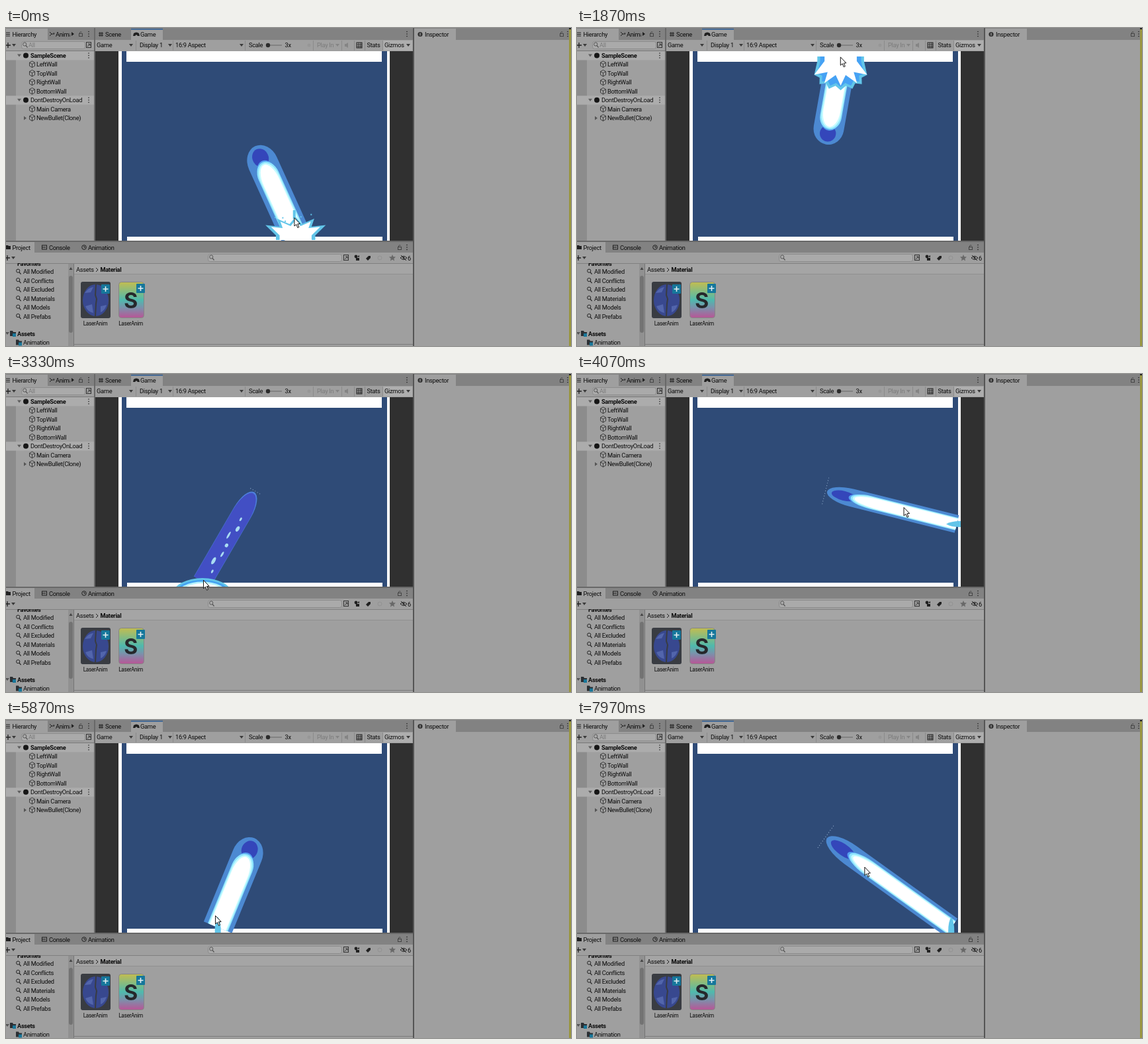
Write an HTML page with a canvas that moves like this. It is 854 by 480 pixels and loops after 8000 ms.

```html
<!DOCTYPE html>
<html lang="en">
<head>
<meta charset="utf-8">
<title>Laser test</title>
<style>
html, body { margin: 0; width: 100%; height: 100%; overflow: hidden; background: #9f9f9f; }
svg, canvas { position: absolute; left: 0; top: 0; width: 854px; height: 480px; }
text { font-family: Roboto, sans-serif; font-size: 9.3px; letter-spacing: -.3px; fill: #0c0c0c; white-space: pre; }
text.bold { font-weight: 700; font-size: 9.2px; }
text.faded { fill: #7c7c7c; }
text.label { font-size: 8.2px; text-anchor: middle; }
text.big { font: 700 32px Inter, sans-serif; text-anchor: middle; fill: #26282c; }
</style>
</head>
<body>
<svg id="ui" viewBox="0 0 854 480">
  <defs>
    <linearGradient id="rainbow" x2="0" y2="1">
      <stop offset="0" stop-color="#c2bd50"/><stop offset=".5" stop-color="#4fb9ad"/>
      <stop offset=".72" stop-color="#7b91ab"/><stop offset="1" stop-color="#b95596"/>
    </linearGradient>
    <clipPath id="tree"><path d="M0 355H93V480H0Z"/></clipPath>
    <clipPath id="tab"><path d="M74 0H97V18H74Z"/></clipPath>
  </defs>
</svg>
<canvas id="stage" width="854" height="480"></canvas>
<script>
const ui = document.getElementById('ui');
const add = (tag, attrs, content = '') => {
  const node = document.createElementNS('http://www.w3.org/2000/svg', tag);
  for (const key in attrs) node.setAttribute(key, attrs[key]);
  node.textContent = content;
  ui.append(node);
};
const box = (x, y, w, h, fill, rx = 0, extra = {}) => add('rect', { x, y, width: w, height: h, fill, rx, ...extra });
const label = (x, y, content, cls = '', extra = {}) => add('text', { x, y, class: cls, ...extra }, content);
const shape = (d, fill = 'none', stroke = 'none', width = 1) => add('path', { d, fill, stroke, 'stroke-width': width });
const dot = (cx, cy, r, fill, stroke = 'none') => add('circle', { cx, cy, r, fill, stroke });
const INK = '#202020', PANEL = '#9f9f9f', BAR = '#828282', EDGE = '#686868', FAINT = '#858585';

const down = (x, y, fill = '#3a3a3a') => shape(`M${x - 3} ${y - 2}h6l-3 4z`, fill);
const right = (x, y, fill = '#555') => shape(`M${x - 2} ${y - 3}v6l4-3z`, fill);
const menu = (x, y) => [-3.5, 0, 3.5].forEach(d => dot(x, y + d, .8, INK));
const lock = (x, y) => {
  box(x - 2.5, y - .5, 5, 4, 'none', 0, { stroke: '#444' });
  shape(`M${x - 1.5} ${y}v-2q1.5-3 3 0`, 'none', '#444');
};
const lens = (x, y, color = INK) => {
  dot(x - .8, y - 1, 2.6, 'none', color);
  shape(`M${x + 1} ${y + 1}l2.6 3`, 'none', color, 1.2);
};
const field = (x, y, w) => { box(x, y, w, 11, '#aaa', 3, { stroke: '#8c8c8c' }); lens(x + 5.5, y + 5, '#555'); };
const picker = (x, y) => {
  box(x, y, 7, 8, 'none', 0, { stroke: '#333' });
  shape(`M${x + 1.5} ${y + 6.5}l4-4m-3 0h3v3`, 'none', '#333');
};
const cube = (x, y) => shape(`M${x} ${y - 5}l4 2.3v5l-4 2.4-4-2.4v-5zm-4 2.3l4 2.3 4-2.3M${x} ${y - .4}v5`, 'none', '#333', .9);
const plus = (x, y) => { shape(`M${x - 4} ${y}h8M${x} ${y - 4}v8`, 'none', INK, 1.3); down(x + 9, y); };
const folder = (x, y) => { shape(`M${x - 4} ${y - 4}h4l1 2h4v6h-9z`, '#2b2f33'); box(x, y, 5, 5, '#1a7799'); };
const badge = (x, y) => { box(x, y, 13, 14, '#16779b', 1); shape(`M${x + 2.5} ${y + 7}h8m-4-4v8`, 'none', '#e4eef2', 1.6); };

// Hierarchy
box(0, 0, 854, 480, PANEL);
box(0, 0, 854, 18, BAR);
box(0, 1, 63, 17, PANEL);
shape('M0 7h6M0 9.5h6M0 12h6', 'none', INK);
label(9.5, 13, 'Hierarchy');
shape('M66 6l3 3-3 3M68 9h5l-1-2', 'none', INK);
label(75, 13, 'Animator', '', { 'clip-path': 'url(#tab)' });
right(101, 9, INK); lock(113, 9); menu(125, 9);
plus(3, 26);
field(23.5, 20.5, 96); label(34, 29, 'All', 'faded'); picker(121.5, 21.5);
box(0, 34, 133, 1, '#777');
box(0, 35, 15, 286, '#8c8c8c');
const hierarchy = ['SampleScene', 'LeftWall', 'TopWall', 'RightWall', 'BottomWall', 'DontDestroyOnLoad', 'Main Camera', 'NewBullet(Clone)'];
hierarchy.forEach((name, i) => {
  const y = 41.5 + i * 13.45;
  if (i % 5) {
    cube(39.5, y);
    label(46, y + 3.4, name);
  } else {
    box(0, y - 6.5, 133, 13.5, '#acacac');
    down(20, y, '#5c5c5c'); dot(30, y, 4, '#161616'); menu(125, y);
    label(37, y + 3.4, name, i ? '' : 'bold');
  }
});
right(29, 136);

// Game view
box(133, 0, 2, 322, EDGE);
label(150, 13, 'Scene'); shape('M142 6v7M145 6v7M140 8h7M140 11h7', 'none', INK);
box(189, 1, 48, 17, PANEL); box(189, 1, 48, 1.6, '#305f95');
shape('M193 8q4-3 8 0l1 4h-3l-2-2-2 2h-3z', INK);
label(203, 13, 'Game'); menu(606, 9);
[196, 252, 361, 464, 507, 526, 542, 569, 603].forEach(x => box(x, 19, 1, 15, '#8b8b8b'));
box(570, 19, 44, 15, '#aeaeae');
label(137, 29, 'Game'); label(202, 29, 'Display 1'); label(256, 29, '16:9 Aspect');
label(367, 29, 'Scale'); label(421.5, 29, '3x');
[189, 248, 356, 608].forEach(x => down(x, 26));
box(396, 25.5, 21, 1, '#666'); dot(396, 26, 3.2, '#2c2c2c');
dot(458, 26, 2.5, '#969696'); label(470, 29, 'Play In', 'faded'); down(501, 26, FAINT);
shape('M512 24h2l3-2v8l-3-2h-2z', FAINT);
box(530, 22, 8, 8, 'none', 0, { stroke: INK }); shape('M530 25h8M530 28h8M533 22v8M536 22v8', 'none', INK, .8);
label(545.5, 29, 'Stats'); label(572, 29, 'Gizmos');
box(135, 35, 480, 286, '#303030');
box(170, 35, 410, 286, '#fff'); box(175, 35, 401, 286, '#2f4b77');
box(182, 35, 386, 16, '#fff'); box(183, 315, 386, 6, '#fff');

// Project
box(0, 321, 616, 2, EDGE); box(0, 323, 615, 16, BAR); box(0, 323, 43, 16, PANEL);
shape('M0 328h3l1 1h3v5h-7z', INK); label(9.5, 334.5, 'Project');
box(54.5, 328, 7, 6, 'none', 0, { stroke: INK }); shape('M55 331h5', 'none', INK); label(65, 334.5, 'Console');
dot(118, 331, 3.3, 'none', INK); shape('M118 329v2h2', 'none', INK); label(124, 334.5, 'Animation');
lock(595, 331); menu(606, 331);
plus(2, 347);
field(305.5, 341.5, 202); picker(510.5, 342.5);
dot(529, 345, 2.4, INK); box(529, 347, 5, 4, INK); shape('M531 345l3-2v3z', INK);
shape('M544 348l4-4h3v3l-4 4z', INK); dot(565, 347, 3, 'none', '#929292');
shape('M584 342l1.4 3.2 3.6.3-2.7 2.4.8 3.6-3.1-2-3.1 2 .8-3.6-2.7-2.4 3.6-.3z', '#686868');
shape('M596 347q5-5 10 0q-5 5-10 0M597 343l8 8', 'none', INK); dot(601, 347, 1.4, INK); label(607, 350.5, '6');
box(0, 355, 615, 1, '#808080');
label(17, 358.5, 'Favorites', 'bold', { 'clip-path': 'url(#tree)' });
['Modified', 'Conflicts', 'Excluded', 'Materials', 'Models', 'Prefabs'].forEach((name, i) => {
  const y = 371 + i * 13.5;
  lens(19, y - 3.4); label(26, y, 'All ' + name);
});
down(2, 461, '#555'); folder(10, 461); label(17, 464.5, 'Assets', 'bold');
folder(19, 474.5); label(26, 478, 'Animation');
box(94, 356, 8, 124, '#919191'); box(95, 374, 6, 86, '#737373', 3); shape('M95.5 365l2.5-4 2.5 4z', '#444');
box(102, 356, 1, 124, '#757575');
box(103, 356, 512, 15, '#a5a5a5'); box(103, 371, 512, 1, '#909090');
label(106, 368, 'Assets'); shape('M136 362l3 3-3 3', 'none', INK); label(142.5, 368, 'Material', 'bold');
box(113, 383, 45, 55, '#393c42', 3);
add('ellipse', { cx: 135.5, cy: 411, rx: 19.5, ry: 24, fill: '#38488f' });
shape('M119 400q5-8 13-9l-4 8zM120 420l10-3 2 13q-9-2-12-10zM143 420l9-2q-3 9-9 11z', '#5265ac');
shape('M136 387l-1 16 2 6-1 7-1 19', 'none', '#393c42', 2);
badge(144, 387);
box(170.5, 383.5, 38, 54, 'url(#rainbow)', 4, { stroke: '#858585' });
label(188.5, 422.5, 'S', 'big'); badge(197, 386);
[135, 188.5].forEach(x => label(x, 448.5, 'LaserAnim', 'label'));
box(103, 477, 512, 1, '#7c7c7c');

// Inspector
box(615, 0, 2, 480, '#555'); box(617, 1, 63, 17, PANEL);
dot(626, 9.5, 3.6, '#333'); box(625.5, 7.5, 1, 4, '#bbb');
label(633, 13, 'Inspector'); lock(840, 9); menu(849, 9);
box(851, 0, 3, 480, '#99963f'); box(851, 0, 3, 2, '#222');

const ctx = document.getElementById('stage').getContext('2d');
const LOOP = 8000, LAG = 33, PIVOT = { x: 376, y: 177 }, HALF = 23, TEAL = '#62c5e9';
const ARROW = new Path2D('M0 0v12.5l2.9-2.5 2.1 5 2-1-2.1-4.7 3.7-.3z');

// Turning points of the mouse: time, angle in degrees (0 right, 90 down), distance
const swings = [
  [-80, 68, 125], [720, -165, 118], [1250, -8, 120], [1870, -80.5, 135], [2400, -180, 120],
  [3330, -240, 155], [4130, -350, 120], [4830, -280, 112], [5250, -258, 120], [5560, -280, 125],
  [5980, -236, 134], [6680, -281, 110], [7230, -450.5, 101], [8000, -322, 74]
];
// Each volley is split evenly into shots of about SHOT milliseconds
const volleys = [-130, 1700, 3000, 4770, 5810, 7170, 7950, 8300], SHOT = 350;

const lerp = (a, b, u) => a + (b - a) * u;
const smooth = u => u * u * (3 - 2 * u);

function aimAt(t) {
  const i = Math.max(1, swings.findIndex(([time]) => time >= t));
  const [t0, angle0, reach0] = swings[i - 1], [t1, angle1, reach1] = swings[i];
  const u = smooth((t - t0) / (t1 - t0));
  const angle = lerp(angle0, angle1, u) * Math.PI / 180;
  return { angle, reach: lerp(reach0, reach1, u), dx: Math.cos(angle), dy: Math.sin(angle) };
}

function shotAge(t) {
  const i = volleys.findIndex(start => start > t);
  const span = volleys[i] - volleys[i - 1];
  return (t - volleys[i - 1]) % (span / Math.round(span / SHOT));
}

function hitWall({ dx, dy }) {
  const side = ((dx > 0 ? 574 : 177) - PIVOT.x) / dx;
  const flat = ((dy > 0 ? 313 : 50) - PIVOT.y) / dy;
  return side < flat
    ? { length: side, turn: -Math.sign(dx) * Math.PI / 2 }
    : { length: flat, turn: dy > 0 ? 0 : Math.PI };
}

function oval(x, y, rx, ry, fill) {
  ctx.beginPath();
  ctx.ellipse(x, y, rx, ry, 0, 0, 2 * Math.PI);
  ctx.fillStyle = fill;
  ctx.fill();
}

// Bar with a rounded nose, from start to end along the beam
function bullet(start, nose, end, half, fill) {
  ctx.beginPath();
  ctx.moveTo(end, half);
  ctx.ellipse(start + nose, 0, nose, half, 0, Math.PI / 2, Math.PI * 1.5);
  ctx.lineTo(end, -half);
  ctx.fillStyle = fill;
  ctx.fill();
}

function drawBeam(length, age) {
  const late = age > 215;
  const half = HALF * (late ? 1 - (age - 200) / 370 : Math.min(1, .5 + age / 100));
  const layer = (start, nose, width, fill) => bullet(start * length, nose * length, length, half * width, fill);
  if (late) {
    layer(.01, .22, 1, '#4d7fdc');
    layer(.025, .24, .97, '#424fc4');
    for (let i = 0; i < 7; i++) {
      oval(length * (.3 + i * .095), -3 - 4 * Math.sin(i * 2.2), 3 + i % 3 * 1.5, 1.5 + i % 2, '#a9dcf2');
    }
  } else {
    layer(.01, .19, 1, '#4c89d2');
    oval(length * .14, 0, length * .095, half * .53, '#3446ba');
    layer(.175, .12, .6, '#549ff0');
    layer(.19, .15, .71, '#8fe5fd');
    layer(.205, .17, .64, '#c5fbff');
    layer(.22, .19, .56, '#fff');
  }
  if (age < 35 || age > 310) {
    const spread = late ? 9 : 21;
    ctx.fillStyle = '#9cb6d4';
    for (let y = -spread; y <= spread; y += 4) ctx.fillRect(-1, y, 1, 1);
  }
}

// Half star standing on the wall; inner is the depth of the notches
function burst(spikes, rx, ry, inner, fill) {
  ctx.beginPath();
  ctx.moveTo(-rx * inner, 7);
  for (let i = 0; i <= spikes * 2; i++) {
    const a = Math.PI * i / (spikes * 2), r = i % 2 ? 1 : inner;
    ctx.lineTo(-rx * r * Math.cos(a), -ry * r * Math.sqrt(Math.abs(Math.sin(a))));
  }
  ctx.lineTo(rx * inner, 7);
  ctx.fillStyle = fill;
  ctx.fill();
}

const random = n => Math.abs(Math.sin(n * 127.1) * 43758.5) % 1;

function drawImpact(age) {
  if (age < 80) {
    bullet(0, 0, 0, 0, TEAL);
    ctx.beginPath();
    ctx.moveTo(-4.5, 8);
    ctx.quadraticCurveTo(-5, -8, 0, -16);
    ctx.quadraticCurveTo(5, -8, 4.5, 8);
    ctx.fillStyle = TEAL;
    ctx.fill();
  } else if (age < 150) {
    burst(5, 48, 28, .62, TEAL);
    burst(5, 39, 23, .62, '#fff');
    ctx.fillStyle = TEAL;
    ctx.fillRect(-4, -38, 4, 13);
    for (let i = 1; i < 8; i++) ctx.fillRect(lerp(-38, 38, random(i)), lerp(-36, -22, random(i + 9)), 2, 2);
  } else if (age < 230) {
    burst(7, 41, 44, .86, TEAL);
    burst(7, 36, 39, .86, '#46a2f4');
    burst(5, 42, 37, .58, '#fff');
  } else {
    const grow = lerp(.75, 1, Math.min(1, (age - 230) / 100));
    [TEAL, '#45a3f2', '#b6f3fd', '#fff'].forEach((fill, i) => oval(0, 20, (45 - i * 3.3) * grow, (25 - i * 2.7) * grow, fill));
  }
}

function drawCursor({ dx, dy, reach }) {
  ctx.save();
  ctx.translate(PIVOT.x + reach * dx, PIVOT.y + reach * dy);
  ctx.fillStyle = '#fff';
  ctx.fill(ARROW);
  ctx.strokeStyle = '#111';
  ctx.stroke(ARROW);
  ctx.restore();
}

function draw(t) {
  const age = shotAge(t), aim = aimAt(t - LAG);
  const { length, turn } = hitWall(aim);

  ctx.clearRect(0, 0, 854, 480);
  ctx.save();
  ctx.beginPath();
  ctx.rect(170, 35, 410, 286);
  ctx.clip();
  ctx.translate(PIVOT.x, PIVOT.y);
  ctx.rotate(aim.angle);
  drawBeam(length, age);
  ctx.translate(length, 0);
  ctx.rotate(turn - aim.angle);
  drawImpact(age);
  ctx.restore();
  drawCursor(aimAt(t));
}

const begin = performance.now();
function tick() {
  draw((performance.now() - begin) % LOOP);
  requestAnimationFrame(tick);
}
tick();
</script>
</body>
</html>
```
